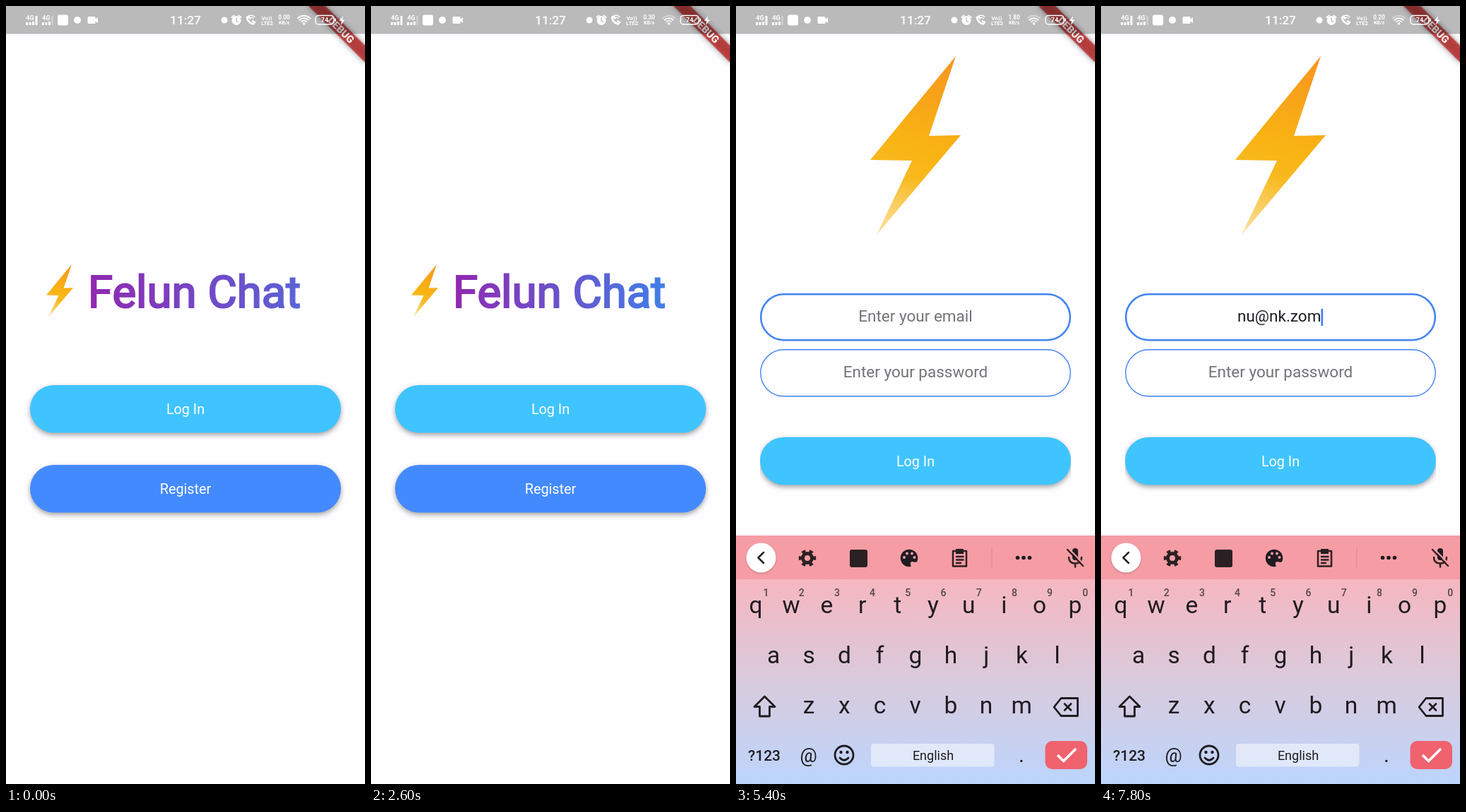
An HTML page that plays this animation: 508x1102 px, repeating every 8 s.

```html
<!DOCTYPE html>
<html lang="en">
<head>
<meta charset="utf-8">
<title>Chat sign-in</title>
<style>
  html, body { margin: 0; overflow: hidden; background: #fefdff; }
  svg { display: block; width: 508px; height: 1102px; font-family: Roboto, sans-serif; }
  .line { fill: none; stroke-linecap: round; stroke-linejoin: round; }
  .mid { text-anchor: middle; }
  .raised { filter: drop-shadow(0 3px 3.5px rgba(0, 0, 0, .36)); }
  .label { fill: #fff; font-size: 19.75px; text-anchor: middle; }
  .field { font-size: 22.5px; text-anchor: middle; }
  .tiny { font-weight: 700; text-anchor: middle; }
</style>
</head>
<body>
<svg viewBox="0 0 508 1102">
  <defs>
    <linearGradient id="gold" gradientUnits="userSpaceOnUse" x1="300" y1="75" x2="205" y2="322">
      <stop stop-color="#f7961e"/><stop offset=".5" stop-color="#f9b413"/>
      <stop offset=".66" stop-color="#f8b91f"/><stop offset="1" stop-color="#fae2a2"/>
    </linearGradient>
    <linearGradient id="shimmer" gradientUnits="userSpaceOnUse" x1="116" x2="200" y1="0" y2="0">
      <stop stop-color="#9128b0"/><stop offset=".333" stop-color="#2f92f3"/>
      <stop offset=".667" stop-color="#ffe93b"/><stop offset="1" stop-color="#f34336"/>
    </linearGradient>
    <linearGradient id="board" x1="0" x2="0" y1="0" y2="1">
      <stop stop-color="#f6b7bf"/><stop offset=".5" stop-color="#d9cbdd"/><stop offset="1" stop-color="#bcd5fc"/>
    </linearGradient>
    <linearGradient id="bubble" x1="0" x2="0" y1="0" y2="1">
      <stop stop-color="#e09fad"/><stop offset="1" stop-color="#eb9aa3"/>
    </linearGradient>
    <clipPath id="column"><path d="M34 40H474V1102H34z"/></clipPath>
  </defs>

  <path fill="#fefdff" d="M0 0H508V1102H0z"/>
  <g id="home">
    <text id="title" x="116" y="427" font-size="63.5" fill="url(#shimmer)" stroke="url(#shimmer)" stroke-width="2.2">Felun Chat</text>
    <g class="raised">
      <rect x="34" y="537" width="440" height="67.5" rx="33.7" fill="#40c4ff"/>
      <rect x="34" y="650" width="440" height="67.5" rx="33.7" fill="#448aff"/>
    </g>
    <text class="label" x="254" y="577.5">Log In</text>
    <text class="label" x="254" y="691">Register</text>
  </g>

  <g id="login">
    <path fill="#fefdff" d="M0 0H508V1102H0z"/>
    <g fill="none" stroke="#4285f0">
      <rect x="35.2" y="408.2" width="437.6" height="65" rx="32.5" stroke-width="2.6"/>
      <rect x="34.8" y="486.8" width="438.4" height="66" rx="33" stroke-width="1.4"/>
    </g>
    <text class="field" id="hint" x="254" y="447" fill="#747376">Enter your email</text>
    <text class="field" id="typed" x="252.2" y="447" fill="#1e1e20"></text>
    <rect id="cursor" y="429" width="2.8" height="24" fill="#4285f0"/>
    <text class="field" x="254" y="526" fill="#747376">Enter your password</text>
    <g clip-path="url(#column)">
      <rect class="raised" x="34" y="610.7" width="440" height="67.5" rx="33.7" fill="#40c4ff"/>
      <text class="label" x="254" y="651.5">Log In</text>
      <g id="signup">
        <text class="mid" x="254" y="719" font-size="19.75" fill="#1c1b25" stroke="#1c1b25" stroke-width=".7">Not Registered ?</text>
        <rect class="raised" x="34" y="746" width="440" height="67.5" rx="33.7" fill="#448aff"/>
        <text class="label" x="254" y="787">Register</text>
      </g>
    </g>
  </g>

  <path id="bolt" fill="url(#gold)" d="M311 71L273 184L318 183L199 324L249 219L190 218z"/>

  <g transform="translate(508) rotate(45)">
    <path fill="#b71c1c" fill-opacity=".76" d="M-57 39.5H57V56.4H-57z" style="filter:drop-shadow(0 0 4px rgba(0,0,0,.5))"/>
    <text class="mid" y="53" font-size="14.4" font-weight="900" fill="#fff" fill-opacity=".93">DEBUG</text>
  </g>

  <g id="status" fill="#fff" stroke="none">
    <path fill="#000" fill-opacity=".265" d="M0 0H508V39.5H0z"/>
    <text class="tiny" x="34" y="20" font-size="9">4G</text>
    <text class="tiny" x="57" y="20" font-size="9">4G</text>
    <path d="M28 23h3v4h-3zM32.5 23h3v4h-3zM37 22h3v5h-3zM41.5 14h3v13h-3zM51 23h3v4h-3zM55.5 23h3v4h-3zM60 22h3v5h-3z"/>
    <path fill-opacity=".4" d="M64.5 14h2v13h-2z"/>
    <rect x="73" y="12.5" width="15" height="15" rx="3"/>
    <circle cx="101" cy="20" r="5"/>
    <path d="M117 15h8q1.500 0 1.500 1.500v2l3.500-2.500v8l-3.500-2.500v2q0 1.500-1.500 1.500h-8q-1.500 0-1.500-1.500v-7q0-1.500 1.500-1.500z"/>
    <text class="mid" x="254" y="26.300" font-size="17.300" font-weight="500">11:27</text>
    <circle cx="309" cy="20" r="4.500"/>
    <circle cx="326" cy="20.500" r="6.500"/>
    <path class="line" stroke="#fff" stroke-width="2" d="M319.500 16l3-2.500M332.500 16l-3-2.500"/>
    <path class="line" stroke="#bcbabc" stroke-width="1.300" d="M326 17v4l2.500 1.500"/>
    <path class="line" stroke="#fff" stroke-width="2.600" d="M341 16q1 8 9 9.500l2-2.500l-3-1.500M341 16l2.500-1.500l1.500 3"/>
    <path class="line" stroke="#fff" stroke-width="1.300" d="M343 14.500q5-3 9 1M346 17q2-1.500 4 .5"/>
    <text class="tiny" x="369" y="19.500" font-size="8">Vo))</text>
    <text class="tiny" x="369.500" y="26.500" font-size="7.800">LTE2</text>
    <text class="tiny" id="rate" x="393.500" y="19" font-size="8.300"></text>
    <text class="tiny" x="393.500" y="26.300" font-size="7">KB/s</text>
    <g id="wifi" class="line" stroke="#fff" stroke-width="2"></g>
    <circle cx="421.500" cy="25" r="1.800"/>
    <rect class="line" x="438" y="13.500" width="26" height="12.500" rx="4" stroke="#fff" stroke-width="1.400"/>
    <path d="M465.500 17.500h1.500v4.500h-1.500zM477 14l-5.500 7h3.500l-1 6l5.500-7.500h-3.500z"/>
    <text class="tiny" x="451" y="23" font-size="9">74</text>
  </g>

  <g id="keyboard" fill="#1f1b20">
    <path fill="url(#board)" d="M0 812H508V1102H0z"/>
    <path fill="#f69ca4" d="M0 750H508V812H0z"/>
    <circle cx="35.500" cy="781.500" r="21" fill="#fff" style="filter:drop-shadow(0 1px 1px rgba(0,0,0,.25))"/>
    <g fill="none" stroke="#2b2023">
      <circle cx="101" cy="782" r="6.500" stroke-width="5"/>
      <circle cx="101" cy="782" r="10" stroke-width="4.500" pathLength="12" stroke-dasharray="1 1" stroke-dashoffset=".5"/>
    </g>
    <rect x="161" y="770" width="25" height="25" rx="3" fill="#2b2023"/>
    <circle cx="245" cy="782" r="12.200"/>
    <g fill="#f69ca4">
      <circle cx="238" cy="781" r="2"/><circle cx="242" cy="775.500" r="2"/>
      <circle cx="249" cy="775.500" r="2"/><circle cx="252.500" cy="781" r="2"/>
      <path d="M258 786q-4 3-8 1q-4 0-3 4l1 4h10z"/>
    </g>
    <path d="M311 769h11v7h-11z"/>
    <g class="line" stroke="#2b2023" stroke-width="2.500">
      <path d="M39 774l-7.500 7.500l7.500 7.500M307 772h19v21.500h-19zM312 780h9.500M312 784.500h9.500M312 789h6"/>
      <path d="M471 781q0 8.500 9 8.500t9-8.500M480 790v4.500M469 770l22 23"/>
    </g>
    <rect x="476" y="768" width="8" height="17" rx="4"/>
    <path stroke="#f69ca4" stroke-width="2" d="M472 769.500l20 21"/>
    <path fill="#d98a92" d="M361.500 767h1v29h-1z"/>
    <circle cx="398.500" cy="781.500" r="2.800"/><circle cx="407" cy="781.500" r="2.800"/><circle cx="415.500" cy="781.500" r="2.800"/>
    <g id="keys" class="mid" font-size="33.500"></g>
    <g class="line" stroke="#1f1b20" stroke-width="2.800">
      <path d="M40.500 978l14.500 14.500h-7.500v13.500h-14v-13.500h-7.500z"/>
      <path d="M450 993l10-12.500h23.500v25h-23.500zM465 988.500l9 9M474 988.500l-9 9"/>
      <circle cx="153" cy="1061" r="13"/>
      <path d="M147 1065q6 6.500 12 0"/>
    </g>
    <circle cx="148.500" cy="1057" r="2.200"/><circle cx="157.500" cy="1057" r="2.200"/>
    <text class="mid" x="40" y="1069" font-size="21" font-weight="500">?123</text>
    <rect x="191" y="1045" width="174.500" height="32.500" rx="4" fill="#fff" fill-opacity=".5"/>
    <text class="mid" x="279" y="1068" font-size="18">English</text>
    <rect x="437.500" y="1041" width="59.500" height="40" rx="10" fill="#ef626e"/>
    <path class="line" stroke="#fff" stroke-width="3.600" style="stroke-linecap:butt;stroke-linejoin:miter" d="M455 1061l8.500 8.500L481 1052"/>
    <g id="popup">
      <rect x="-27" y="-126" width="54" height="157" rx="5" fill="url(#bubble)" style="filter:drop-shadow(0 2px 2px rgba(0,0,0,.3))"/>
      <text id="pressed" class="mid" x="-1" y="-73" font-size="40"></text>
    </g>
  </g>
</svg>
<script>
const LOOP = 8000;
const $ = id => document.getElementById(id);
const set = (id, attrs) => { for (const k in attrs) $(id).setAttribute(k, attrs[k]); };
const show = (id, on) => set(id, { visibility: on ? 'inherit' : 'hidden' });
const clamp = x => Math.min(1, Math.max(0, x));
const mix = (a, b, u) => a + (b - a) * u;

// CSS-style cubic bezier easing, solved by bisection
function bezier(x1, y1, x2, y2) {
  const at = (a, b, s) => 3 * a * s * (1 - s) ** 2 + 3 * b * s * s * (1 - s) + s ** 3;
  return x => {
    let lo = 0, hi = 1;
    for (let i = 0; i < 20; i++) {
      const s = (lo + hi) / 2;
      if (at(x1, x2, s) < x) lo = s; else hi = s;
    }
    return at(y1, y2, hi);
  };
}
const easeIn = bezier(.42, 0, 1, 1);
const easeOut = bezier(0, 0, .58, 1);
const fastOutSlowIn = bezier(.4, 0, .2, 1);

// Keyboard layout: letters, first centre x, row centre y
const keys = {};
const rows = [['qwertyuiop', 28, 848], ['asdfghjkl', 53, 919], ['zxcvbnm', 103, 990]];
let markup = '';
for (const [letters, x0, y] of rows) {
  [...letters].forEach((c, i) => {
    const x = x0 + i * 50.2;
    keys[c] = [x, y];
    markup += `<text x="${x}" y="${y + 12}">${c}</text>`;
    if (y === 848) {
      markup += `<text x="${x + 14.5}" y="836" font-size="14" font-weight="500" fill="#54444a">${(i + 1) % 10}</text>`;
    }
  });
}
keys['@'] = [102, 1062];
keys['.'] = [404, 1062];
markup += '<text x="102.500" y="1071" font-size="27">@</text><text x="404" y="1071" font-size="30">.</text>';
$('keys').innerHTML = markup;

$('wifi').innerHTML = [5, 8.5, 12].map(r => {
  const d = r * .72;
  return `<path d="M${421.5 - d} ${26 - d}A${r} ${r} 0 0 1 ${421.5 + d} ${26 - d}"/>`;
}).join('');

// Each key is held for 100 ms and typed on release
const presses = [['n', 5500], ['u', 6300], ['@', 6400], ['n', 6900], ['k', 7000],
  ['.', 7300], ['z', 7500], ['o', 7600], ['m', 7700]];

function drawTitle(t) {
  const p = t < 1400 ? .51 + t / 2000 : (Math.min(t, 3300) - 1777) / 2000;
  const on = p > 0 && p < 1;
  set('title', { opacity: on ? easeOut(clamp(p / .1)) * (1 - easeIn(clamp((p - .8) / .2))) : 0 });
  if (on) set('shimmer', { x2: 116 + Math.max(1, 4930 * easeIn(p)) });
}

function drawPage(t) {
  const u = clamp((t - 3600) / 200), f = fastOutSlowIn(u), size = mix(.2965, 1, f);
  set('login', { opacity: easeIn(u) });
  show('login', u > 0);
  set('bolt', { transform: `translate(${mix(57, 190, f)} ${mix(366, 71, f)}) scale(${size}) translate(-190 -71)` });
  show('signup', t < 4900);
}

function drawTyping(t) {
  const text = presses.filter(([, down]) => t >= down + 100).map(([c]) => c).join('');
  $('typed').textContent = text;
  show('hint', !text);
  const blinkOff = t < 4000 || (t >= 4400 && t < 4800) || (t >= 5400 && t < 5600) || (t >= 6100 && t < 6400);
  show('cursor', !blinkOff);
  set('cursor', { x: 252.2 + (text ? $('typed').getComputedTextLength() / 2 : 0) });

  const held = presses.find(([, down]) => t >= down && t < down + 100);
  show('popup', held);
  if (held) {
    const [x, y] = keys[held[0]];
    set('popup', { transform: `translate(${x + .5} ${y})` });
    $('pressed').textContent = held[0];
  }
}

function draw(t) {
  drawTitle(t);
  drawPage(t);
  drawTyping(t);
  const rise = easeOut(clamp((t - 4820) / 280));
  set('keyboard', { transform: `translate(0 ${352 * (1 - rise)})` });
  show('keyboard', rise > 0);
  $('rate').textContent = t < 300 ? '0.00' : t < 3300 ? '0.30' : t < 6300 ? '1.80' : '0.20';
  $('wifi').firstChild.setAttribute('opacity', t < 300 ? 1 : .75);
  $('wifi').lastChild.setAttribute('opacity', t < 300 ? 1 : .4);
}

const start = performance.now();
function tick() {
  draw((performance.now() - start) % LOOP);
  requestAnimationFrame(tick);
}
tick();
</script>
</body>
</html>
```
